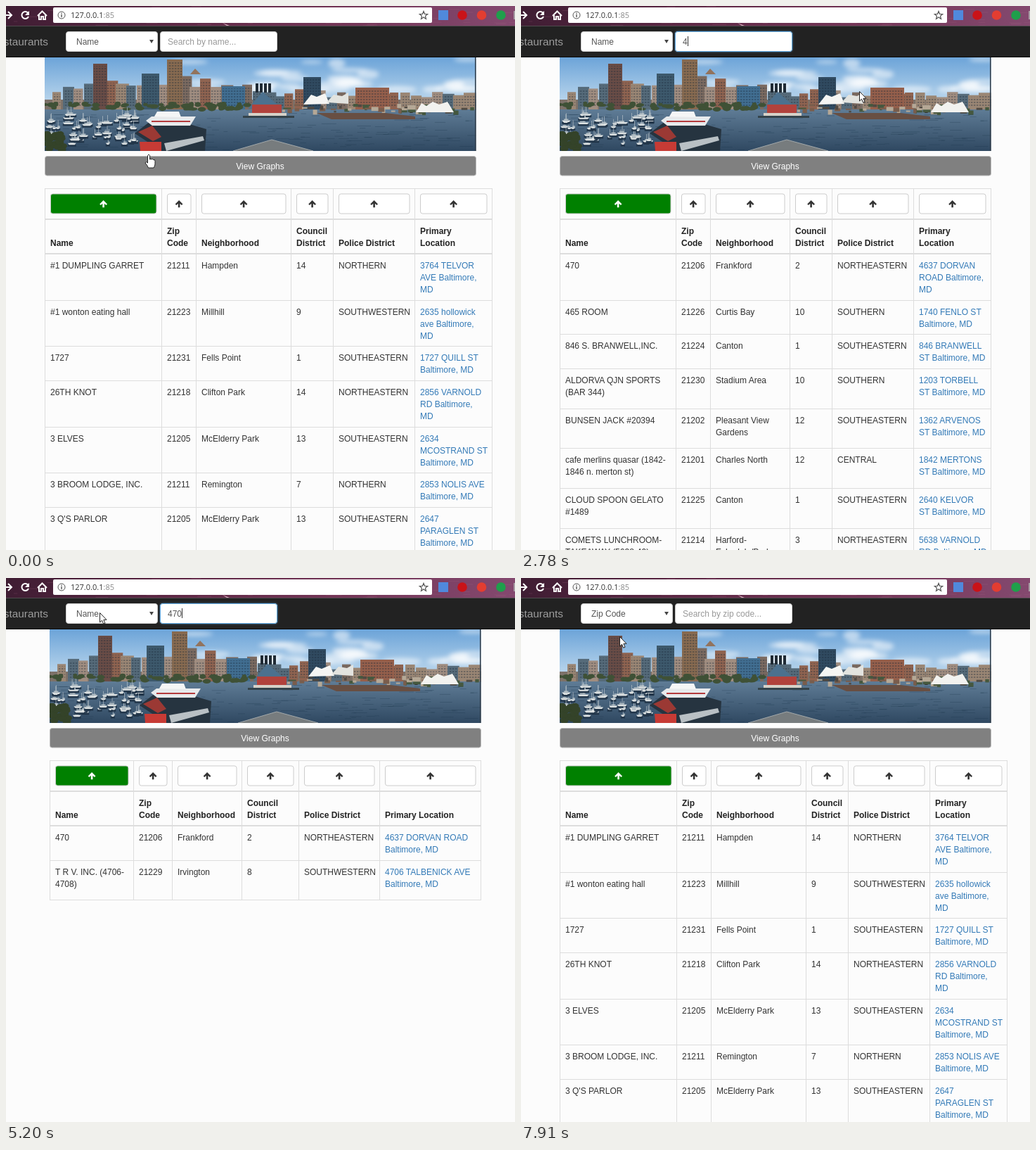
These frames come from a looping animation (724x773 px, 8000 ms). An HTML page:

```html
<!DOCTYPE html>
<html lang="en">
<head>
<meta charset="utf-8">
<title>Restaurant search</title>
<style>
html, body { margin: 0; width: 100%; height: 100%; overflow: hidden; background: #fcfcfc; }
svg { display: block; width: 724px; height: 773px; font: 12px "Liberation Sans", Arial, sans-serif; fill: #333; }
.head { font-weight: bold; fill: #222; }
.link { fill: #337ab7; }
.field { fill: #fff; stroke: #ccc; }
.focus { fill: #fff; stroke: #66afe9; filter: drop-shadow(0 0 1.5px #66afe999); }
.value { fill: #555; }
.hint { fill: #999; }
</style>
</head>
<body>
<svg id="stage" viewBox="0 0 724 773"></svg>
<script>
const LOOP = 8000;
let css = '', count = 0;

// Stepped timelines written as [ms, declaration] pairs.
function timeline(frames) {
  const name = 'step' + count++;
  const rules = frames.map(([ms, rule]) => `${ms / LOOP * 100}%{${rule}}`).join('');
  css += `@keyframes ${name}{${rules}}`;
  return `style="animation:${name} ${LOOP}ms step-end infinite"`;
}
const show = (...spans) => timeline([[0, 'opacity:0'],
  ...spans.flatMap(([from, to]) => [[from, 'opacity:1'], [to, 'opacity:0']])]);
const move = stops => timeline(stops.map(([ms, x, y]) => [ms, `transform:translate(${x}px,${y}px)`]));
const group = (attrs, body) => `<g ${attrs}>${body}</g>`;
const rect = (x, y, w, h, fill, more = '') =>
  `<rect x="${x}" y="${y}" width="${w}" height="${h}" fill="${fill}" ${more}/>`;
const path = (d, fill, more = '') => `<path d="${d}" fill="${fill}" ${more}/>`;
const text = (x, y, value, cls = '', more = '') => `<text x="${x}" y="${y}" class="${cls}" ${more}>${value}</text>`;
const oval = (x, y, rx, ry, fill) => `<ellipse cx="${x}" cy="${y}" rx="${rx}" ry="${ry}" fill="${fill}"/>`;
const fade = (id, attrs, ...colors) => `<linearGradient id="${id}" ${attrs}>` +
  colors.map((color, i) => `<stop offset="${i / (colors.length - 1)}" stop-color="${color}"/>`).join('') + '</linearGradient>';

let seed = 7;
const random = (min, max) => {
  seed = seed * 16807 % 2147483647;
  return +(min + (max - min) * seed / 2147483647).toFixed(1);
};
const pick = list => list[Math.floor(random(0, list.length))];
const repeat = (n, draw) => Array.from({ length: n }, (_, i) => draw(i)).join('');

const WATERLINE = 147;
const brick = ['#8f6350', '#7b6a60', '#a08d80', '#566b7a', '#9a8674'];
const building = (x, top, w, color) => rect(x, top, w, WATERLINE - top, color) +
  rect(x + 1, top + 3, w - 2, WATERLINE - top - 8, 'url(#windows)');

function skyline() {
  // Low blocks across the shore, taller towards the centre-left.
  const blocks = repeat(40, i => {
    const x = 66 + i * 15;
    const rise = 30 * Math.exp(-(((x - 225) / 110) ** 2));
    return building(x, random(118, 130) - rise * random(.3, 1), random(12, 19), pick(brick));
  });
  return rect(55, 133, 614, 15, '#7c7169') + blocks +
    building(124, 82, 20, '#694c46') + building(193, 96, 25, '#3d596c') + building(229, 76, 22, '#876a50') +
    building(307, 114, 33, '#416e91') + building(423, 101, 25, '#304a60') + building(497, 116, 48, '#955f4b') +
    path('M262 97 269 89 277 97z', '#92735d') + repeat(4, i => rect(355 + i * 6, 110, 4, 13, '#202b35')) +
    path('M344 146 365 122 393 146z', '#4c718e');
}

function harbor() {
  const trees = repeat(60, () => oval(random(55, 345), random(139, 147), random(3, 7), random(2, 4), '#3f5136'));
  const shore = repeat(55, () => rect(random(385, 665), random(139, 149), random(3, 12), random(2, 7),
    pick(['#795d4c', '#504a43', '#b5a896', '#45583f'])));
  const ripples = repeat(150, () => rect(random(60, 665), random(152, 205), random(5, 22), .8, '#19334a55'));
  const boats = repeat(60, () => {
    const x = random(56, 180), y = random(153, 198), w = random(6, 16);
    return rect(x, y + 2, w, 3, '#22364a') + path(`M${x} ${y}h${w}l-2 2.5h${4 - w}z`, '#dfe3e3') +
      rect(x + 3, y - 2, w / 2, 2, '#aab7bf') + rect(x + w / 2, y - 10, .6, 10, '#c5ced2');
  });
  const tents = path('M423 140 434 126 442 129 454 124 460 139z', '#f5f5f3') +
    path('M456 137 466 126 478 128 487 123V139z', '#e2e3df') +
    path('M583 151 591 138 598 142 607 136 616 140 628 136 637 151z', '#f2f2ef');
  const station = rect(350, 140, 42, 13, '#b1423c') + rect(345, 152, 54, 4, '#d6d1c8') + rect(337, 156, 73, 3, '#34434b');
  return trees + shore + tents + ripples + station + path('M442 152H540L582 157V161H463z', '#684f43') + boats;
}

const ship = path('M183 181 205 164 238 161 285 175 283 206H221z', '#263440') +
  path('M188 179 208 170 221 186 209 192z', '#9b3934') + path('M190 193h31v13h-30z', '#c73b35') +
  path('M199 163 207 157H270L262 170H208z', '#e7eaec') + path('M211 157 215 150H246L249 158z', '#f5f6f6') +
  rect(207, 163, 55, 2, '#b33b3d') + path('M225 195 280 185 282 191 228 206z', '#b9c0c4');

function photo() {
  // Clouds gather towards the horizon and the right.
  const clouds = repeat(30, () => {
    const y = random(76, 122);
    return oval(random(260, 690), y, random(12, 36), random(2, 7), '#ffffff88');
  });
  return `<defs>${fade('sky', 'x2="0" y2="1"', '#6ba3d8', '#c8dff0')}${fade('water', 'x2="0" y2="1"', '#5f7c96', '#2f4861')}
    <pattern id="windows" width="4" height="4" patternUnits="userSpaceOnUse">${rect(0, 0, 2.4, 2, '#17283555')}</pattern>
    <filter id="soft"><feGaussianBlur stdDeviation="3"/></filter>
    <clipPath id="frame">${rect(55, 72, 613.5, 134, '#000')}</clipPath></defs>` +
    group('clip-path="url(#frame)"',
      rect(55, 72, 614, 76, 'url(#sky)') + group('filter="url(#soft)"', clouds) + skyline() +
      rect(55, WATERLINE, 614, 59, 'url(#water)') + harbor() + ship +
      path('M323 206 378 190 437 206', '#777c7e', 'stroke="#a2a8aa"') +
      repeat(25, () => oval(random(55, 83), random(181, 205), 6, 4, '#344329')) +
      rect(667, 72, 2, 134, '#2c3a48'));
}

const arrowUp = (x, fill) => path('M0-5.2 5.4.2 3.7 1.9 1.3-.5V5H-1.3V-.5L-3.7 1.9-5.4.2z', fill,
  `transform="translate(${x} 281.2)"`);

const LINE = 17.14, CELL_PADDING = 14.3, PARAGRAPH_GAP = 8.2;

// Rows are "cell;cell;..." with "|" between the lines of a cell.
function table(cols, location, rows) {
  const left = cols[0], width = cols[6] - left;
  const titles = ['Name', 'Zip|Code', 'Neighborhood', 'Council|District', 'Police District', location];
  let out = '';
  titles.forEach((title, i) => {
    const x = cols[i], w = cols[i + 1] - x, lines = title.split('|');
    out += rect(x + 8.5, 267, w - 15.5, 28, i ? '#fff' : '#008000', 'rx="3" stroke="#ccc"');
    out += arrowUp(x + w / 2 + .6, i ? '#333' : '#fff');
    lines.forEach((line, k) => out += text(x + 8, 341 - 17 * (lines.length - 1 - k), line, 'head'));
  });
  out += rect(left, 259, width, 1, '#ddd') + rect(left, 302, width, 2, '#ddd') + rect(left, 351, width, 2, '#ddd');
  let y = 352.5;
  for (const row of rows) {
    const cells = row.split(';').map(cell => cell.split('|'));
    cells.forEach((lines, i) => lines.forEach((line, k) =>
      out += text(cols[i] + 8, Math.floor(y) + 21 + 17 * k, line, i === 5 ? 'link' : '')));
    y += CELL_PADDING + Math.max(...cells.map((lines, i) => lines.length * LINE + (i < 5 ? PARAGRAPH_GAP : 0)));
    out += rect(left, Math.floor(y), width, 1, '#ddd');
  }
  return out + cols.map(x => rect(x, 259, 1, Math.floor(y) - 258, '#ddd')).join('');
}

const CITY = 'Baltimore, MD';
const allRows = [
  '#1 DUMPLING GARRET;21211;Hampden;14;NORTHERN;3764 TELVOR|AVE Baltimore,|MD',
  '#1 wonton eating hall;21223;Millhill;9;SOUTHWESTERN;2635 hollowick|ave Baltimore,|MD',
  `1727;21231;Fells Point;1;SOUTHEASTERN;1727 QUILL ST|${CITY}`,
  '26TH KNOT;21218;Clifton Park;14;NORTHEASTERN;2856 VARNOLD|RD Baltimore,|MD',
  `3 ELVES;21205;McElderry Park;13;SOUTHEASTERN;2634|MCOSTRAND ST|${CITY}`,
  `3 BROOM LODGE, INC.;21211;Remington;7;NORTHERN;2853 NOLIS AVE|${CITY}`,
  `3 Q'S PARLOR;21205;McElderry Park;13;SOUTHEASTERN;2647|PARAGLEN ST|${CITY}`
];
const firstRows = [
  '470;21206;Frankford;2;NORTHEASTERN;4637 DORVAN|ROAD Baltimore,|MD',
  `465 ROOM;21226;Curtis Bay;10;SOUTHERN;1740 FENLO ST|${CITY}`,
  `846 S. BRANWELL,INC.;21224;Canton;1;SOUTHEASTERN;846 BRANWELL|ST ${CITY}`,
  `ALDORVA QJN SPORTS|(BAR 344);21230;Stadium Area;10;SOUTHERN;1203 TORBELL|ST ${CITY}`,
  `BUNSEN JACK #20394;21202;Pleasant View|Gardens;12;SOUTHEASTERN;1362 ARVENOS|ST ${CITY}`,
  `cafe merlins quasar (1842-|1846 n. merton st);21201;Charles North;12;CENTRAL;1842 MERTONS|ST ${CITY}`,
  `CLOUD SPOON GELATO|#1489;21225;Canton;1;SOUTHEASTERN;2640 KELVOR|ST ${CITY}`,
  `COMETS LUNCHROOM-|TAKEAWAY (5638-40);21214;Harford-|Echodale/Park;3;NORTHEASTERN;5638 VARNOLD|RD ${CITY}`
];
const secondRows = [
  '470;21206;Frankford;2;NORTHEASTERN;4637|DORVAN|ROAD|Baltimore,|MD',
  'DAMASK PARLOR (475 1/2 E.|VALLINDER STREET);21202;Downtown;11;CENTRAL;475|VALLINDER|ST|Baltimore,|MD',
  'LUCKY KETTLE DINERS(6472-74);21224;Broening|Manor;1;SOUTHEASTERN;6472|MARIBUND|AVE|Baltimore,|MD',
  'T R V. INC. (4706-4708);21229;Irvington;8;SOUTHWESTERN;4706|TALBENICK|AVE|Baltimore,|MD'
];
const lastRows = [
  `470;21206;Frankford;2;NORTHEASTERN;4637 DORVAN ROAD|${CITY}`,
  `T R V. INC. (4706-|4708);21229;Irvington;8;SOUTHWESTERN;4706 TALBENICK AVE|${CITY}`
];

// Moments at which the page changes.
const FOCUS = 1240, TYPE_1 = 2780, TYPE_2 = 3210, TYPE_3 = 3940, OPEN = 5470, CHOOSE = 7620;

const tables = [
  [[55, 221, 270, 405, 465, 581, 691], 'Primary|Location', allRows, [0, TYPE_1], [CHOOSE, LOOP]],
  [[55, 220, 269, 382, 442, 558, 668], 'Primary|Location', firstRows, [TYPE_1, TYPE_2]],
  [[62, 268, 317, 416, 477, 592, 675], 'Primary|Location', secondRows, [TYPE_2, TYPE_3]],
  [[62, 181, 236, 335, 416, 531, 675], 'Primary Location', lastRows, [TYPE_3, CHOOSE]]
].map(([cols, location, rows, ...spans]) => group(show(...spans), table(cols, location, rows))).join('');

// The page recentres while it has no scrollbar.
const banner = group(move([[0, 0, 0], [TYPE_2, 7, 0], [CHOOSE, 0, 0]]),
  photo() + rect(55.5, 213.5, 613, 27.5, '#808080', 'rx="3" stroke="#bbb"') +
  text(361.5, 231.5, 'View Graphs', '', 'text-anchor="middle" style="fill:#fff"'));

function browserBar() {
  const stroke = 'stroke="#fff" stroke-width="2"';
  const specks = repeat(60, () => rect(random(0, 724), random(0, 28), random(4, 24), 1, '#b06f8d30'));
  const badges = ['#c91318', '#e33d31', '#1f9f4b'].map((color, i) => oval(649 + i * 27.5, 13, 6.8, 6.8, color)).join('');
  const star = Array.from({ length: 10 }, (_, i) => {
    const r = i % 2 ? 2.6 : 6, a = i * Math.PI / 5;
    return `${(594 + r * Math.sin(a)).toFixed(1)} ${(13.4 - r * Math.cos(a)).toFixed(1)}`;
  }).join(' ');
  return fade('theme', '', '#3f1d33', '#5f2946', '#743657', '#84496f') +
    rect(0, 0, 724, 28, 'url(#theme)') + specks + path('M308 24l10 4h-4z', '#d7aebd') +
    path('M0 13H8M3 8 8 13 3 18', 'none', stroke) +
    path('M31.5 10A5 5 0 1 0 32 15', 'none', stroke) + path('M33 7v6h-6z', '#fff') +
    path('M45 14 51.5 7.5 58 14M47 13v6h3v-4h3v4h3v-6', 'none', stroke) +
    rect(67, 2, 539, 22, '#fff', 'rx="2"') +
    '<circle cx="79" cy="13" r="5" fill="none" stroke="#555"/>' + rect(78.3, 12, 1.4, 4, '#555') + rect(78.3, 9.8, 1.4, 1.4, '#555') +
    `<text x="92" y="17" font-size="11" font-family="Open Sans,sans-serif">127.0.0.1<tspan fill="#888">:85</tspan></text>` +
    path(`M${star}z`, 'none', 'stroke="#555" stroke-width="1.2"') +
    rect(615, 6, 14, 14, '#5089dc') + badges + rect(722, 7, 2, 12, '#a79ca3');
}

const items = ['Name', 'Zip Code', 'Neighborhood', 'Council District', 'Police District', 'Primary Address'];
const ITEM = 15.1;
const menuItem = (i, style = '') => text(100, 76.8 + ITEM * i, items[i], 'value', style);
const picked = (i, span) => group(show(span), rect(86, 65 + ITEM * i, 129, 15.5, '#1e90ff') + menuItem(i, 'style="fill:#fff"'));
const menu = group(show([OPEN, CHOOSE]),
  rect(85.5, 64.5, 130, 92.5, '#fff', 'stroke="#82a9d0"') + items.map((_, i) => menuItem(i)).join('') +
  picked(0, [OPEN, 7470]) + picked(1, [7470, CHOOSE]));

const box = (x, w, cls, more = '') => rect(x, 36.5, w, 28, '#fff', `rx="3.5" class="${cls}" ${more}`);
const shown = (x, value, cls, from, to) => text(x, 54.5, value, cls, show([from, to]));
const caret = group(show([FOCUS, 1660], [2200, 3660], [TYPE_3, 4500], [5060, OPEN]),
  group(move([0, TYPE_1, TYPE_2, TYPE_3].map((ms, i) => [ms, 230 + Math.round(6.7 * i), 43])), rect(0, 0, 1, 14, '#333')));
const navbar = rect(0, 28, 724, 45, '#222') + rect(0, 28, 724, 1, '#504a4e') + rect(0, 72, 724, 1, '#090909') +
  text(60, 55.5, 'Restaurants', '', 'text-anchor="end" font-size="15.4" style="fill:#9d9d9d"') +
  box(85.5, 130, 'field') + box(85.5, 130, 'focus', show([OPEN, 7750])) +
  box(219.5, 166, 'field') + box(219.5, 166, 'focus', show([FOCUS, OPEN])) +
  path('M204 48h6l-3 5z', '#444') +
  shown(100, 'Name', 'value', 0, CHOOSE) + shown(100, 'Zip Code', 'value', CHOOSE, LOOP) +
  shown(230, 'Search by name...', 'hint', 0, TYPE_1) + shown(230, '4', 'value', TYPE_1, TYPE_2) +
  shown(230, '47', 'value', TYPE_2, TYPE_3) + shown(230, '470', 'value', TYPE_3, CHOOSE) +
  shown(230, 'Search by zip code...', 'hint', CHOOSE, LOOP) + caret;

// A curved pointer stroke, sampled at evenly spaced moments.
function glide(start, end, steps, from, bend, to) {
  return Array.from({ length: steps }, (_, i) => {
    const t = i / (steps - 1), u = 1 - t;
    const [x, y] = from.map((p, k) => Math.round(u * u * p + 2 * u * t * bend[k] + t * t * to[k]));
    return [start + (end - start) * t, x, y];
  });
}
const outline = 'stroke="#222" stroke-linejoin="round"';
const hand = path('M-1.5 12V1.5Q0-1.5 1.6 1.5V7Q3.5 5.5 4 7 6 5.5 6.5 7.5 9 6.5 9 9.5V14Q8.5 17 7 19H-.5Q-2 15-5 12-4 9-1.5 12z', '#fff', outline);
const arrow = path('M.5.5V14L3.5 11.2 5.7 16.2 8 15.2 5.9 10.3H10z', '#fff', outline);
const beam = path('M-3-7Q0-7 0-5 0-7 3-7M0-5V5M-3 7Q0 7 0 5 0 7 3 7', 'none', 'stroke="#222" stroke-width="1.2"');
const pointer = group(move([
  [0, 203, 211],
  ...glide(150, 970, 7, [180, 180], [-20, 30], [262, 46]),
  ...glide(FOCUS, 1660, 4, [310, 68], [405, 105], [481, 121]),
  ...glide(4500, 5200, 6, [483, 117], [360, -70], [133, 49]),
  [5590, 138, 87],
  ...glide(6650, 7320, 5, [138, 87], [127, 78], [128, 91]),
  ...glide(CHOOSE, 7910, 3, [130, 86], [136, 87], [140, 83])
]), group(show([0, 150]), hand) + group(show([830, 1380]), beam) +
  group(show([150, 830], [1380, TYPE_2], [4500, LOOP]), arrow));

document.getElementById('stage').innerHTML = rect(0, 0, 724, 773, '#fcfcfc') +
  banner + tables + browserBar() + navbar + menu + pointer;
document.head.appendChild(document.createElement('style')).textContent = css;
</script>
</body>
</html>
```
